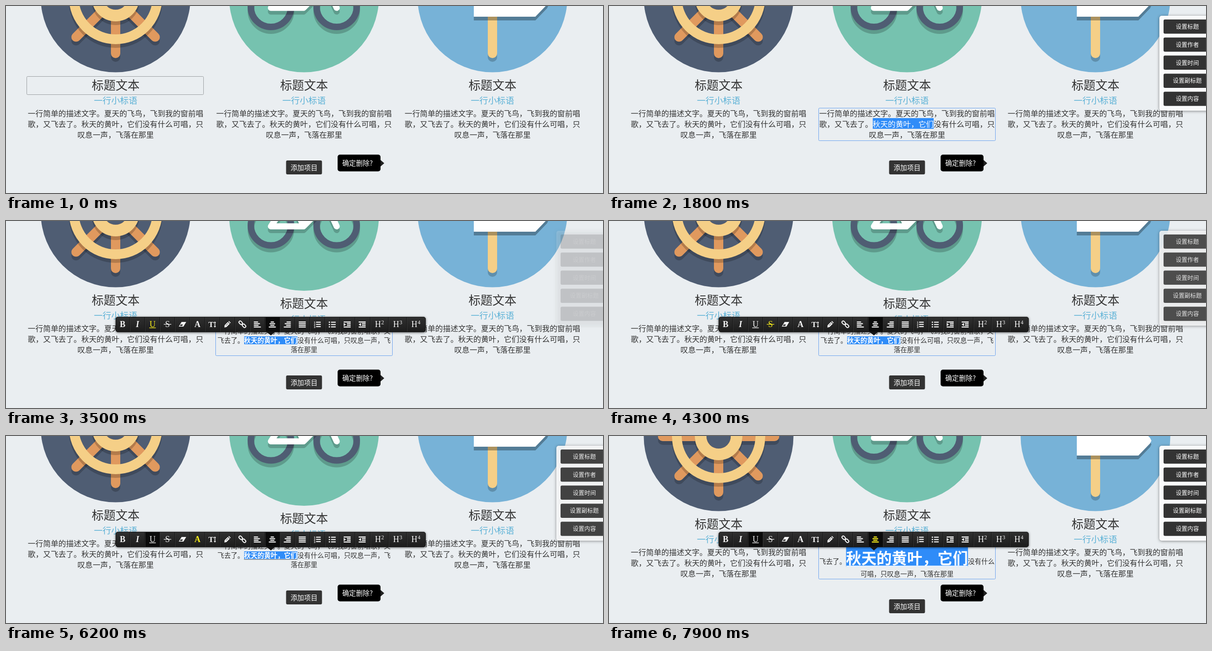
An HTML page with a canvas for the animation above (8 s loop, 1280x402 px).

```html
<!DOCTYPE html>
<html lang="zh">
<head>
<meta charset="utf-8">
<style>
html, body { margin: 0; width: 100%; height: 100%; overflow: hidden; background: #eaeef1; }
canvas { display: block; }
</style>
</head>
<body>
<canvas id="stage" width="1280" height="402"></canvas>
<script>
const c = document.getElementById('stage').getContext('2d');
const CJK = '"Noto Sans CJK SC", "Noto Sans CJK", sans-serif';
const SERIF = '"Liberation Serif", serif';
const SANS = '"Liberation Sans", sans-serif';
const YELLOW = '#f8ee1c', INK = '#333', SAND = '#f5cf87', SLATE = '#4f5d73';
const PICKED = '秋天的黄叶，它们';
const LOOP = 8000, STEP = 100;

// ---- helpers ----
const at = (t, list) => list.reduce((v, [start, value]) => t >= start ? value : v, list[0][1]);

function ease(t, keys) {
  for (let i = 1; i < keys.length; i++) {
    const [t0, a] = keys[i - 1], [t1, b] = keys[i];
    if (t < t1) return a + (b - a) * (.5 - Math.cos(Math.PI * Math.max(0, (t - t0) / (t1 - t0))) / 2);
  }
  return keys[keys.length - 1][1];
}

function text(str, x, base, size, color = INK, weight = 350, family = CJK, align = 'left') {
  c.font = `${weight} ${size}px ${family}`;
  c.textAlign = align;
  c.fillStyle = color;
  c.fillText(str, x, base);
}

const centered = (str, x, mid, size, color, weight) =>
  text(str, x, mid + size * .38, size, color, weight, CJK, 'center');

function rect(x, y, w, h, color) {
  c.fillStyle = color;
  c.fillRect(x, y, w, h);
}

function rounded(x, y, w, h, r, fill, stroke) {
  c.beginPath();
  c.roundRect(x, y, w, h, r);
  if (fill) { c.fillStyle = fill; c.fill(); }
  if (stroke) { c.strokeStyle = stroke; c.lineWidth = 1; c.stroke(); }
}

function poly(points, color) {
  c.beginPath();
  points.forEach(p => c.lineTo(...p));
  c.closePath();
  c.fillStyle = color;
  c.fill();
}

function line(points, width, color) {
  c.beginPath();
  points.forEach(p => c.lineTo(...p));
  c.lineWidth = width;
  c.lineCap = c.lineJoin = 'round';
  c.strokeStyle = color;
  c.stroke();
}

function ring(x, y, outer, inner, color) {
  c.beginPath();
  c.arc(x, y, (outer + inner) / 2, 0, 7);
  c.lineWidth = outer - inner;
  c.strokeStyle = color;
  c.stroke();
}

function shadow(color, blur, dy) {
  c.shadowColor = color;
  c.shadowBlur = blur;
  c.shadowOffsetY = dy;
}
const noShadow = () => shadow('transparent', 0, 0);

function withShade(draw, alpha = .2) {
  c.save();
  c.translate(0, 8);
  draw(`rgba(0,0,0,${alpha})`);
  c.restore();
  draw();
}

// ---- pictures, drawn around the centre of their disc ----
function wheel() {
  withShade(shade => {
    c.beginPath();
    for (let i = 0; i < 8; i++) {
      const a = i * Math.PI / 4;
      c.moveTo(0, 0);
      c.lineTo(120 * Math.cos(a), 120 * Math.sin(a));
    }
    c.lineWidth = 20;
    c.lineCap = 'round';
    c.strokeStyle = shade || '#e0995e';
    c.stroke();
  });
  withShade(shade => {
    ring(0, 0, 100, 79, shade || SAND);
    ring(0, 0, 51, 26, shade || SAND);
  });
  c.beginPath();
  c.arc(0, 0, 26, 0, 7);
  c.fillStyle = SLATE;
  c.fill();
}

function bike() {
  withShade(shade => [-71, 70].forEach(x => ring(x, 20, 50, 36, shade || SLATE)));
  withShade(shade => {
    c.beginPath();
    c.moveTo(-29, -42); c.lineTo(-71, 22); c.lineTo(-1, 22); c.lineTo(62, -42);
    c.moveTo(-1, 22); c.lineTo(-29, -42);
    c.moveTo(70, 22); c.lineTo(45, -32);
    c.lineWidth = 13;
    c.lineCap = c.lineJoin = 'round';
    c.strokeStyle = shade || '#fff';
    c.stroke();
  });
}

function signpost() {
  withShade(shade => line([[0, 0], [0, 120]], 20, shade || SAND));
  withShade(shade => poly([[-40, -22], [92, -22], [117, 3], [120, 9], [117, 15], [92, 41], [-40, 41]],
    shade || '#fff'), .3);
}

const columns = [
  { x: 235, color: SLATE, picture: wheel },
  { x: 639, color: '#76c2af', picture: bike },
  { x: 1043, color: '#77b2d7', picture: signpost }
];

function head({ x, color, picture }, dy) {
  c.save();
  c.translate(x, dy - 18);
  c.beginPath();
  c.arc(0, 0, 160.5, 0, 7);
  c.fillStyle = color;
  c.fill();
  c.clip();
  picture();
  c.restore();
  centered('标题文本', x, 170 + dy, 25.7);
  centered('一行小标语', x, 203 + dy, 18.6, '#5bb1d6');
}

// ---- description text ----
const SMALL = 14.28, NORMAL = 16.37, BIG = 32.7;

function plainText(x, dy) {
  ['一行简单的描述文字。夏天的飞鸟，飞到我的窗前唱',
   '歌，又飞去了。秋天的黄叶，它们没有什么可唱，只',
   '叹息一声，飞落在那里'].forEach((s, i) => centered(s, x, 231 + 23 * i + dy, NORMAL));
}

// A line whose middle run may be selected, bold and underlined.
function pickedLine(before, after, base, size, big, top, bottom, count, bold, underline) {
  const width = (before.length + after.length) * size + PICKED.length * big;
  const x = 639 - width / 2, start = x + before.length * size;
  const weight = bold ? 700 : 350;
  text(before, x, base, size);
  text(after, start + PICKED.length * big, base, size);
  text(PICKED, start, base, big, INK, weight);
  if (underline) rect(start, base + big * .1 + .5, PICKED.length * big, Math.max(1.4, big / 16), INK);
  if (!count) return;
  c.save();
  c.beginPath();
  c.rect(start, top, count * big, bottom - top);
  c.clip();
  rect(start, top, count * big, bottom - top, '#2f8cf8');
  text(PICKED, start, base, big, '#fff', weight);
  if (underline) rect(start, base + big * .1 + .5, PICKED.length * big, Math.max(1.4, big / 16), '#fff');
  c.restore();
}

function editedText(t, mode) {
  const count = t >= 6400 && t < 7100 ? 0 : Math.max(0, Math.min(8, Math.floor((t - 900) / 75)));
  if (mode === 0) {
    centered('一行简单的描述文字。夏天的飞鸟，飞到我的窗前唱', 639, 231, NORMAL);
    pickedLine('歌，又飞去了。', '没有什么可唱，只', 260.2, NORMAL, NORMAL, 241, 264, count);
    centered('叹息一声，飞落在那里', 639, 277, NORMAL);
    return;
  }
  centered('一行简单的描述文字。夏天的飞鸟，飞到我的窗前唱歌，又', 639, mode === 1 ? 237 : 230, SMALL);
  if (mode === 1) {
    pickedLine('飞去了。', '没有什么可唱，只叹息一声，飞', 262.4, SMALL, SMALL, 248, 265, count, true, t >= 4700);
    centered('落在那里', 639, 277, SMALL);
  } else {
    pickedLine('飞去了。', '没有什么', 275, SMALL, BIG, 239, 281, count, true, true);
    centered('可唱，只叹息一声，飞落在那里', 639, 297, SMALL);
  }
}

// ---- toolbar ----
const bars = (widths, side, color, x0 = -7.5, full = 15) => widths.forEach((w, i) =>
  rect(x0 + (full - w) * side, -6 + 3.6 * i, w, 2.2, color));
const letter = (s, style = 700) => color => text(s, 0, 6, 18, color, style, SERIF, 'center');

function indent(color, dir) {
  rect(-7.5, -6, 15, 2.2, color);
  rect(-7.5, 4.8, 15, 2.2, color);
  bars([8, 8], 1, color, -7.5, 15);
  rect(-.5, 1.2, 8, 2.2, color);
  poly([[-5 - 2.5 * dir, -3], [-5 + 2.5 * dir, .5], [-5 - 2.5 * dir, 4]], color);
}

const icons = [
  letter('B'), letter('I', 'italic 700'),
  color => { letter('U', 400)(color); rect(-7, 7, 14, 1.3, color); },
  color => { letter('S', 400)(color); rect(-8, -.5, 16, 1.3, color); },
  color => {
    poly([[-2, -5], [8, -5], [2, 5], [-8, 5]], color);
    poly([[-4, .5], [1, .5], [-.8, 3.5], [-5.8, 3.5]], '#222');
  },
  letter('A'),
  color => {
    text('T', -3, 6, 17, color, 700, SERIF, 'center');
    rect(4.6, -4, 1.5, 9, color);
    poly([[2.8, -3], [5.3, -6], [7.8, -3]], color);
    poly([[2.8, 4], [5.3, 7], [7.8, 4]], color);
  },
  color => {
    poly([[-6.5, 7], [-6, 2], [1, -5], [5, -1], [-2, 6]], color);
    poly([[2, -6], [3.5, -7], [7, -3.5], [6, -2]], color);
    line([[-3, 2.5], [1.5, -2]], 1, '#222');
  },
  color => [[-3.6, -3.3], [3.6, 3.3]].forEach(([x, y]) => {
    c.save();
    c.translate(x, y);
    c.rotate(Math.PI / 4);
    c.beginPath();
    c.roundRect(-4.2, -2.7, 8.4, 5.4, 2.7);
    c.lineWidth = 2;
    c.strokeStyle = color;
    c.stroke();
    c.restore();
  }),
  color => bars([9, 13, 10, 15], 0, color),
  color => bars([7, 12, 9, 15], .5, color),
  color => bars([9, 13, 10, 15], 1, color),
  color => bars([15, 15, 15, 15], 0, color),
  color => [1, 2, 3].forEach((n, i) => {
    rect(-2.5, -5.5 + 4.7 * i, 10, 2.2, color);
    text(n, -5.7, -2 + 5 * i, 6, color, 700, SANS, 'center');
  }),
  color => [-5.5, -.5, 4.5].forEach(y => {
    rect(-2.5, y, 10, 2.2, color);
    rounded(-7.5, y - .4, 3, 3, 1.5, color);
  }),
  color => indent(color, 1),
  color => indent(color, -1),
  ...[2, 3, 4].map(n => color => {
    text('H', -3.5, 6, 18, color, 400, SERIF, 'center');
    text(n, 6.5, 0, 12, color, 400, SERIF, 'center');
  })
];
const cellX = i => i < 17 ? 233.4 + 32.2 * i : 781.5 + 39 * (i - 17);
const iconX = i => i < 17 ? 250 + 32.1 * i : 801 + 39 * (i - 17);

function toolbar(t) {
  const hover = at(t, [[0, -1], [2600, 0], [3300, 1], [3400, 2], [3800, 3], [4500, 2],
    [5500, 3], [5600, 4], [5700, 5], [6500, -1], [7900, 10]]);
  c.globalAlpha = ease(t, [[1800, 0], [2200, 1]]);
  const fill = c.createLinearGradient(0, 206, 0, 239);
  fill.addColorStop(0, '#303030');
  fill.addColorStop(1, '#1c1c1c');
  shadow('rgba(0,0,0,.6)', 5, 1);
  rounded(235, 206, 665, 33, 5, fill);
  noShadow();
  rounded(235.5, 206.5, 664, 32, 5, null, '#161616');
  icons.forEach((icon, i) => {
    const active = i === 10 || i === 2 && t >= 4700;
    if (active) rect(cellX(i), 207, 32, 31, '#0b0b0b');
    if (i) {
      rect(cellX(i) - 1, 207, 1, 31, '#111');
      rect(cellX(i), 207, 1, 31, '#383838');
    }
    c.save();
    c.translate(iconX(i), 222);
    icon(i === hover ? YELLOW : '#f4f4f4');
    c.restore();
  });
  poly([[560, 239], [576, 239], [568, 246]], '#141414');
  c.globalAlpha = 1;
}

function sizeMenu(t) {
  const hover = at(t, [[0, -1], [6600, 0], [6700, 2], [6800, 3], [6900, 4], [7000, 5]]);
  const sizes = [12, 13, 16, 18, 24, 32], middles = [252, 270, 290, 313, 343, 384];
  shadow('rgba(0,0,0,.5)', 4, 1);
  rect(394, 240, 127, 170, '#232323');
  noShadow();
  sizes.forEach((size, i) => {
    const y = middles[i], half = size * .7;
    if (i === hover) rect(394, y - half, 127, half * 2, '#000');
    text(size + 'px', 405, y + size * .34, size, i === hover ? YELLOW : '#fff', 400, SANS);
  });
}

function panel(alpha) {
  if (!alpha) return;
  c.globalAlpha = alpha;
  shadow('rgba(0,0,0,.45)', 6, 1);
  rounded(1180, 21, 120, 204, 5, '#fafbfc');
  noShadow();
  ['标题', '作者', '时间', '副标题', '内容'].forEach((s, i) => {
    const y = 29 + 38.8 * i;
    rounded(1189, y, 102, 30.5, 3, INK);
    centered('设置' + s, 1240, y + 15.3, 12.4, '#fff', 400);
  });
  c.globalAlpha = 1;
}

function outlines(t) {
  const box = (x, y, h, color) => rounded(x + .5, y + .5, 379, h, 2, null, color);
  if (t < 100) box(44, 151, 39, '#9b9ea1');
  else if (t < 200) box(44, 190, 27, '#9b9ea1');
  else if (t < 300) box(44, 219, 70, '#9b9ea1');
  else if (t >= 400 && t < 800) box(449, 219, 70, '#9b9ea1');
  else if (t >= 800 && t < 3100) box(449, 219, 70, '#6ca3ee');
  else if (t >= 3100 && t < 6200) box(449, 226, 63, '#6ca3ee');
  else if (t >= 7100) box(449, 219, 88, '#6ca3ee');
}

function draw(t) {
  const mode = at(t, [[0, 0], [3100, 1], [7100, 2]]);
  const drop = mode === 2 ? 19 : 0;
  rect(0, 0, 1280, 402, '#eaeef1');
  columns.forEach((col, i) => {
    head(col, i === 1 ? (mode === 1 ? 7.5 : 0) : drop);
    if (i !== 1) plainText(col.x, drop);
  });
  editedText(t, mode);
  outlines(t);

  rounded(600.5, 332 + drop, 77, 30, 3, INK);
  centered('添加项目', 639, 347.5 + drop, 14.4, '#fff', 400);
  poly([[803, 331], [811, 338], [803, 345]], '#222');
  rounded(711, 319.5, 92, 36, 5, '#000');
  text('确定删除?', 721, 343.2, 14.6, '#fff', 400);

  panel(ease(t, [[800, 0], [1300, 1], [3100, 1], [3650, 0], [4000, 0], [4400, 1], [4600, 1],
    [5150, 0], [5400, 0], [5800, 1], [6100, 1], [6650, 0], [7400, 0], [7800, 1]]));
  if (t > 1800) toolbar(t);
  if (t >= 6500 && t < 7100) sizeMenu(t);
}

function tick() {
  draw(Math.floor(performance.now() % LOOP / STEP) * STEP);
  requestAnimationFrame(tick);
}
tick();
</script>
</body>
</html>
```
